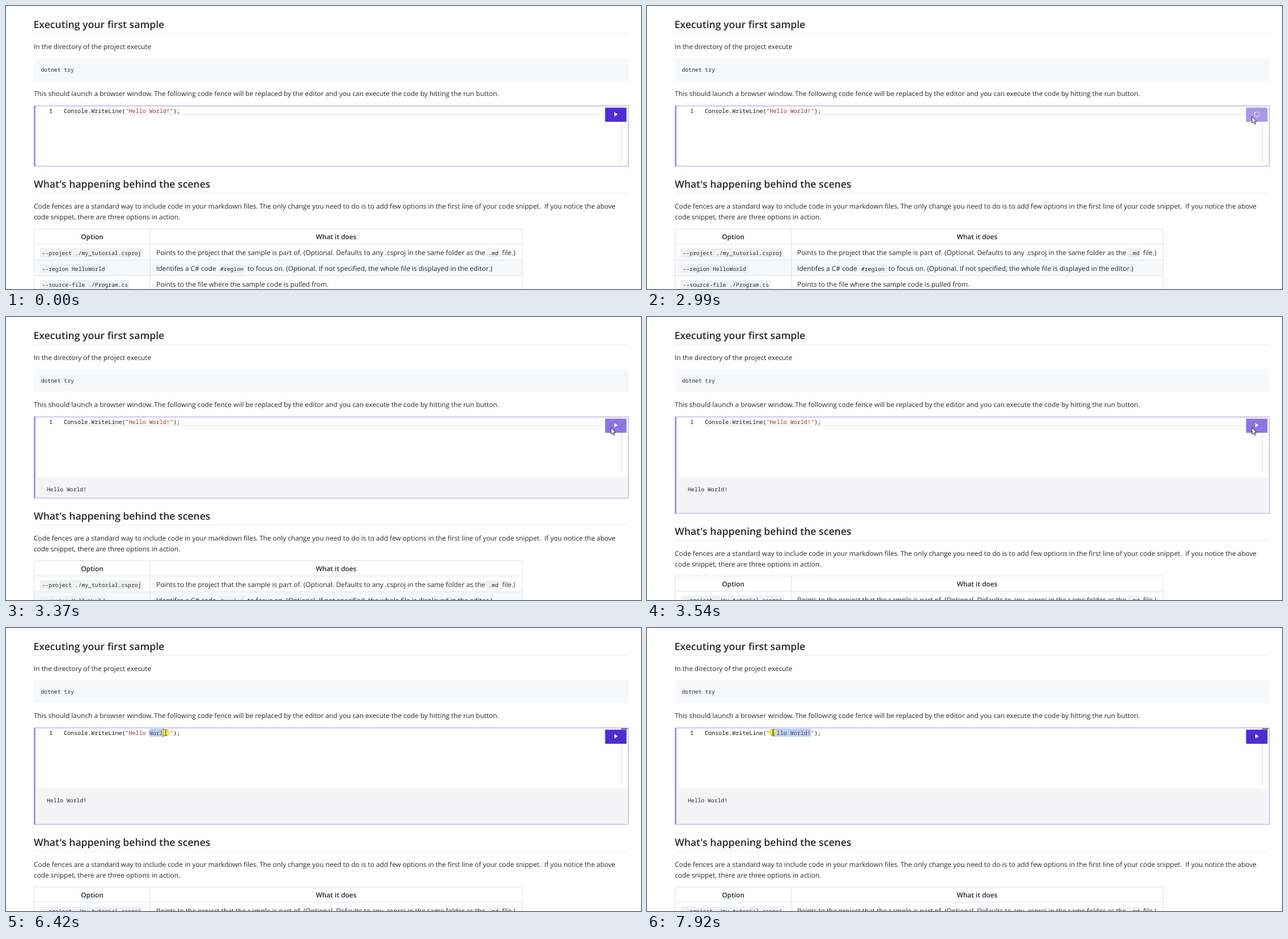
An HTML page for the animation above (8 s loop, 1120 by 500 pixels).

```html
<!DOCTYPE html>
<html lang="en">
<head>
<meta charset="utf-8">
<title>First sample</title>
<style>
  html, body { margin: 0; width: 100%; height: 100%; overflow: hidden; background: #fff; }
  svg { display: block; }
  text { fill: #24292e; white-space: pre; text-rendering: geometricPrecision; }
  .p, .th { font: 11.87px "Open Sans", "Noto Sans", sans-serif; }
  .th { font-weight: 600; text-anchor: middle; }
  .h { font: 600 17.63px "Open Sans", "Noto Sans", sans-serif; }
  .code { font: 9.73px "Noto Sans Mono", "DejaVu Sans Mono", monospace; }
  .ed { font: 10.06px "Noto Sans Mono", "DejaVu Sans Mono", monospace; fill: #111; }
</style>
</head>
<body>
<svg id="stage" width="1120" height="500" viewBox="0 0 1120 500"></svg>
<script>
const NS = "http://www.w3.org/2000/svg";
const stage = document.getElementById("stage");

function add(parent, tag, attrs, content) {
  const el = document.createElementNS(NS, tag);
  for (const k in attrs) el.setAttribute(k, attrs[k]);
  if (content) el.textContent = content;
  parent.appendChild(el);
  return el;
}
const group = parent => add(parent, "g", {});
const text = (g, x, y, cls, s) => add(g, "text", { x, y, class: cls }, s);
const rect = (g, x, y, width, height, fill, rx = 0) =>
  add(g, "rect", { x, y, width, height, fill, rx });
const show = (el, on) => el.setAttribute("visibility", on ? "visible" : "hidden");
const move = (el, x, y) => el.setAttribute("transform", `translate(${x} ${y})`);

// Page top
text(stage, 48.5, 38.5, "h", "Executing your first sample");
rect(stage, 49, 48, 1049, 1, "#eaecef");
text(stage, 49, 76, "p", "In the directory of the project execute");
rect(stage, 49, 92.5, 1049, 40, "#f6f8fa", 2.3);
text(stage, 61.5, 116, "code", "dotnet try");
text(stage, 49, 159, "p", "This should launch a browser window.");
text(stage, 261, 159, "p", "The following code fence will be replaced by the editor and you can execute the code by hitting the run button.");

// Part of the page pushed down by the output panel
const lower = group(stage);
text(lower, 49, 320.5, "h", "What's happening behind the scenes");
rect(lower, 49, 330, 1049, 1, "#eaecef");
text(lower, 49, 358, "p", "Code fences are a standard way to include code in your markdown files.");
text(lower, 447, 358, "p", "The only change you need to do is to add few options in the first line of your code snippet.");
text(lower, 949.5, 358, "p", "If you notice the above");
text(lower, 49, 376.5, "p", "code snippet, there are three options in action.");
rect(lower, 49, 448, 862, 28, "#f6f8fa");
for (const y of [393, 420, 448, 476]) rect(lower, 49, y, 862, 1, "#dfe2e5");
for (const x of [49, 254, 910]) rect(lower, x, 393, 1, 112, "#dfe2e5");
text(lower, 152, 411.5, "th", "Option");
text(lower, 582.3, 411.5, "th", "What it does");

function chip(x, base, w, s) {
  rect(lower, x, base - 11.5, w, 16.5, "#f0f1f2", 2.3);
  text(lower, x + 4, base, "code", s);
}
chip(59.5, 439.5, 182, "--project ./my_tutorial.csproj");
chip(59.5, 467.5, 118.5, "--region HelloWorld");
chip(59.5, 495.5, 159, "--source-file ./Program.cs");
text(lower, 265, 439.5, "p", "Points to the project that the sample is part of. (Optional. Defaults to any .csproj in the same folder as the");
chip(847, 439.5, 25, ".md");
text(lower, 875, 439.5, "p", "file.)");
text(lower, 265, 467.5, "p", "Identifes a C# code");
chip(374, 467.5, 48.5, "#region");
text(lower, 426, 467.5, "p", "to focus on. (Optional. If not specified, the whole file is displayed in the editor.)");
text(lower, 265, 495.5, "p", "Points to the file where the sample code is pulled from.");

// Editor
const clip = add(add(stage, "clipPath", { id: "panel" }), "rect", { x: 49, y: 283, width: 1049, height: 0 });
const output = add(stage, "g", { "clip-path": "url(#panel)" });
rect(output, 55, 283, 1041, 64, "#f4f4f6");
text(output, 72, 307.5, "code", "Hello World!");

const frame = add(stage, "rect", { x: 49.5, y: 176.5, width: 1048, height: 106.5, fill: "none", stroke: "#ab9be2" });
const bar = rect(stage, 49, 176, 3, 107, "#a592e4");
rect(stage, 1085, 178, 1, 100, "#dddddd");
const lineMark = group(stage);
rect(lineMark, 102, 178, 983, 1, "#ebebeb");
rect(lineMark, 102, 191, 983, 1, "#e2e2e2");
const tick = rect(stage, 1085, 177.5, 11, 1.5, "#424242");

const LEFT = 102, CHAR = 6.04;
const selection = rect(stage, 0, 178, 0, 14, "#add6ff");
text(stage, 76, 188.5, "ed", "1");
const code = text(stage, LEFT, 188.5, "ed", "");
for (const [s, fill] of [["Console.WriteLine(", "#111"], ['"Hello World!"', "#96302f"], [");", "#111"]])
  add(code, "tspan", { style: "fill:" + fill }, s);
const caret = rect(stage, 0, 178, 1.2, 14, "#111");

// Run button
const button = rect(stage, 1056.7, 179.6, 37.8, 25, "#512bd4");
const play = add(stage, "path", { d: "M1073 187.5 L1079 191.3 L1073 195 Z", fill: "#fff" });
const spinner = group(stage);
for (let i = 0; i < 8; i++) {
  const a = i * Math.PI / 4;
  add(spinner, "circle", {
    cx: 1075.5 + 4.3 * Math.cos(a), cy: 191.3 + 4.3 * Math.sin(a),
    r: 1.15, fill: "#fff", opacity: 0.3 + 0.1 * i
  });
}

// Mouse
const halo = add(stage, "circle", { r: 7, fill: "#fff033", opacity: 0.7 });
const arrow = add(stage, "path", {
  d: "M0 0 V11.6 L2.7 9.1 L4.6 13.4 L6.5 12.6 L4.6 8.4 H8.3 Z",
  fill: "#fff", stroke: "#111", "stroke-width": 0.9
});
const beam = add(stage, "path", {
  d: "M-2.5 -5 H-0.7 L0 -4.4 L0.7 -5 H2.5 M0 -4.4 V4.4 M-2.5 5 H-0.7 L0 4.4 L0.7 5 H2.5",
  fill: "none", stroke: "#222", "stroke-width": 0.9
});

// Mouse moves: start, end, steps, easing, target, optional bend
const easeOut = u => 1 - (1 - u) ** 2;
const smooth = u => u * u * (3 - 2 * u);
const linear = u => u;
const HOME = [1091, 508];
const moves = [
  [70, 810, 11, easeOut, [1063, 199], [1071, 353]],
  [890, 970, 2, linear, [1066, 198]],
  [1130, 1200, 2, linear, [1067, 195.5]],
  [4470, 5260, 11, smooth, [256, 191], [700, 278]],
  [5330, 5560, 4, linear, [253, 186.5]],
  [5960, 6420, 7, smooth, [282, 185]],
  [6580, 6670, 2, linear, [283.5, 184]],
  [6820, 7210, 6, smooth, [290, 185]],
  [7360, 7760, 6, smooth, [224, 185.5]],
  [7920, 7921, 1, linear, [222, 184.5]]
];

function mouseAt(t) {
  let from = HOME;
  for (const [a, b, n, ease, to, bend] of moves) {
    if (t < a) break;
    if (t >= b) { from = to; continue; }
    const k = Math.floor((t - a) / (b - a) * (n - 1) + 0.01) + 1;
    const u = ease(k / n), v = 1 - u;
    return from.map((p, i) => {
      const mid = bend ? bend[i] : (p + to[i]) / 2;
      return v * v * p + 2 * u * v * mid + u * u * to[i];
    });
  }
  return from;
}

// Last value whose time has come
function stepAt(table, t) {
  let value = 0;
  for (const [at, v] of table) if (t >= at) value = v;
  return value;
}
const growth = [[3140, 4], [3220, 15], [3300, 26], [3370, 37], [3450, 54], [3540, 64]];

function draw(t) {
  const shift = stepAt(growth, t);
  move(lower, 0, shift);
  clip.setAttribute("height", shift);
  frame.setAttribute("height", 106.5 + shift);
  bar.setAttribute("height", 107 + shift);

  const busy = t >= 2370 && t < 3140;
  const hover = t >= 890 && t < 4470;
  button.setAttribute("fill", busy ? "#a997ea" : hover ? "#8e74e5" : "#512bd4");
  show(play, !busy);
  show(spinner, busy);
  const turn = Math.max(0, Math.floor((t - 2600) / 77.5) + 1);
  spinner.setAttribute("transform", `rotate(${turn * 45} 1075.5 191.3)`);

  const [x, y] = mouseAt(t);
  const editing = t >= 4470 && x < 1057;
  show(arrow, t >= 70 && !editing);
  show(beam, editing);
  move(arrow, x, y);
  move(beam, x, y);
  move(halo, x, y);
  show(halo, (t >= 5810 && t < 6670) || t >= 7210);

  // Columns of the selection: first drag rightwards, second one leftwards
  const col = Math.floor((x + 0.9 - LEFT) / CHAR);
  const second = t >= 7210;
  const anchor = second ? 31 : 25;
  const end = second ? Math.min(31, col) : t < 6580 ? Math.max(25, col) : 29;
  const active = t >= 5810;
  const selected = active && end !== anchor;
  selection.setAttribute("x", LEFT + Math.min(anchor, end) * CHAR);
  selection.setAttribute("width", Math.abs(end - anchor) * CHAR);
  caret.setAttribute("x", LEFT + end * CHAR - 0.2);
  show(selection, selected);
  show(caret, active);
  show(tick, active);
  show(lineMark, !selected);
}

const start = performance.now();
function loop() {
  draw((performance.now() - start) % 8000);
  requestAnimationFrame(loop);
}
loop();
</script>
</body>
</html>
```
